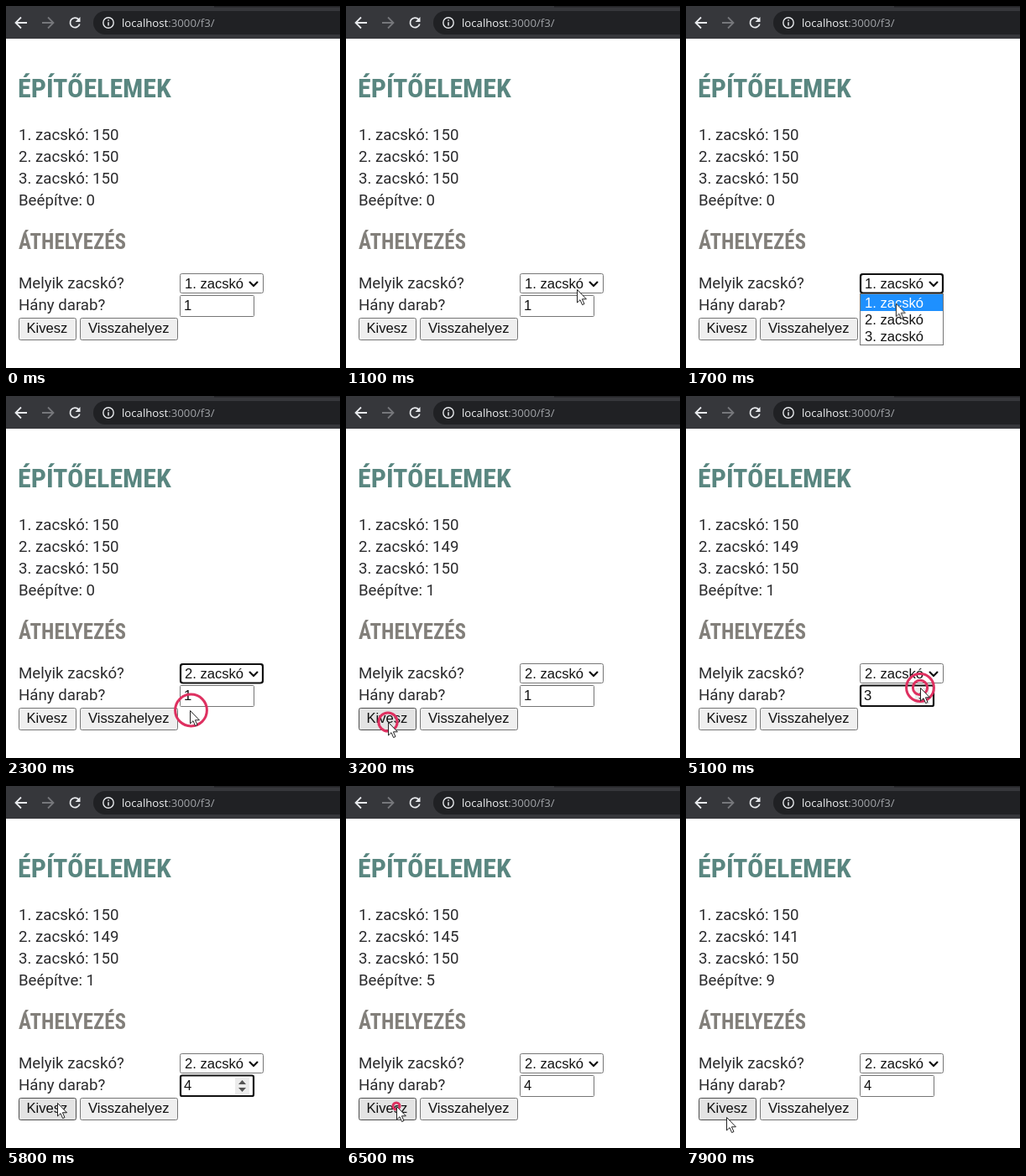
An HTML page that plays this animation: 398x432 px, repeating every 8 s.

```html
<!DOCTYPE html>
<html lang="hu">
<head>
<meta charset="utf-8">
<title>Építőelemek</title>
<style>
html, body { margin: 0; width: 100%; height: 100%; overflow: hidden; background: #fff; }
svg { display: block; }
text { white-space: pre; }

.body { font: 18.67px Roboto, sans-serif; fill: #2b2b2d; }
.head { font-family: "Roboto Condensed", Roboto, sans-serif; font-weight: 700; font-stretch: 75%; }
.ui { font: 16.6px "Liberation Sans", Arial, sans-serif; fill: #111; }
.url { font: 13.2px "Open Sans", sans-serif; fill: #a0a3a7; }
.icon { fill: none; stroke: #e8eaed; stroke-width: 1.8; }
.field { fill: #fff; stroke: #767676; }
.button { fill: #efefef; stroke: #767676; }
.focus { fill: none; stroke: #101010; stroke-width: 2.2; }

/* State changes: hard cuts on one shared 8 s clock */
.step { animation: 8s step-end infinite; }
.count { animation-name: count; }
.choice { animation-name: choice; }
.amount { animation-name: amount; }
.popup { animation-name: popup; }
.pick { animation-name: pick; }
.first { animation-name: first; }
.second { animation-name: second; }
.select-focus { animation-name: select-focus; }
.amount-focus { animation-name: amount-focus; }
.spinner { animation-name: spinner; }
.hover { animation-name: hover; }

@keyframes count {
  0% { transform: none; }
  38.1% { transform: translateY(-26px); }
  76.4% { transform: translateY(-52px); }
  91.6%, 100% { transform: translateY(-78px); }
}
@keyframes choice {
  0% { transform: none; }
  28.4%, 100% { transform: translateY(-26px); }
}
@keyframes amount {
  0% { transform: none; }
  60.2% { transform: translateY(-26px); }
  63% { transform: translateY(-52px); }
  65.8%, 100% { transform: translateY(-78px); }
}
@keyframes popup {
  0% { visibility: hidden; }
  15% { visibility: visible; }
  28.4%, 100% { visibility: hidden; }
}
@keyframes pick {
  0% { transform: none; }
  22.5%, 100% { transform: translateY(20px); }
}
@keyframes first {
  0% { fill: #fff; }
  22.5%, 100% { fill: #111; }
}
@keyframes second {
  0% { fill: #111; }
  22.5%, 100% { fill: #fff; }
}
@keyframes select-focus {
  0% { visibility: hidden; }
  15% { visibility: visible; }
  37%, 100% { visibility: hidden; }
}
@keyframes amount-focus {
  0% { visibility: hidden; }
  59.8% { visibility: visible; }
  75.8%, 100% { visibility: hidden; }
}
@keyframes spinner {
  0% { visibility: hidden; }
  55% { visibility: visible; }
  75.8%, 100% { visibility: hidden; }
}
@keyframes hover {
  0% { fill: #efefef; stroke: #767676; }
  35.2% { fill: #e3e3e3; stroke: #4f4f4f; }
  45% { fill: #efefef; stroke: #767676; }
  71.8%, 100% { fill: #e3e3e3; stroke: #4f4f4f; }
}

/* Pointer path */
.pointer { animation: path 8s ease-in-out infinite; }
@keyframes path {
  0%, 6% { transform: translate(372px, 436px); }
  13.5%, 17.5% { transform: translate(275px, 338px); }
  25.5%, 29.2% { transform: translate(219px, 375px); animation-timing-function: ease-in; }
  31.5% { transform: translate(150px, 394px); animation-timing-function: ease-out; }
  35.7%, 43.75% { transform: translate(50px, 389px); }
  51.25% { transform: translate(241px, 371px); }
  55.6%, 66.5% { transform: translate(279px, 348px); }
  72.5% { transform: translate(61px, 378px); }
  75.5%, 86.25% { transform: translate(60px, 382px); }
  89.5%, 93.5% { transform: translate(36px, 391px); }
  98%, 100% { transform: translate(48px, 395px); }
}

/* Click ring: closes in on the pointer in half a second */
.ring {
  fill: none; stroke: #de3060; stroke-width: 3; visibility: hidden;
  animation: click 8s linear var(--at) infinite;
}
@keyframes click {
  0% { r: 20px; visibility: visible; }
  6% { r: 3px; visibility: visible; }
  6.01%, 100% { r: 3px; visibility: hidden; }
}
</style>
</head>
<body>
<svg width="398" height="432" viewBox="0 0 398 432">
  <rect width="398" height="432" fill="#fff"/>

  <!-- Browser bar -->
  <rect width="398" height="39" fill="#36373b"/>
  <rect x="248" width="150" height="1.5" fill="#222326"/>
  <rect x="104" y="6" width="320" height="28" rx="14" fill="#202124"/>
  <path class="icon" d="M25 20H12M18 13.5L11.5 20L18 26.5"/>
  <path class="icon" style="stroke:#76777b" d="M43 20H56M50 13.5L56.5 20L50 26.5"/>
  <path class="icon" d="M86.6 16A5.8 5.8 0 1 0 87.8 21.5"/>
  <path d="M88.5 13V19H82.5Z" fill="#e8eaed"/>
  <circle class="icon" cx="122" cy="20" r="6.2" style="stroke-width:1.4"/>
  <path class="icon" style="stroke-width:1.5" d="M122 16.2V17.8M122 19.2V23.6"/>
  <text class="url" x="138" y="25"><tspan fill="#f1f3f4">localhost</tspan>:3000/f3/</text>

  <!-- Page -->
  <text class="head" x="14" y="108.5" font-size="32" fill="#598680">ÉPÍTŐELEMEK</text>
  <text class="head" x="15" y="290" font-size="25" fill="#827f7a">ÁTHELYEZÉS</text>
  <g class="body">
    <text x="15" y="160">1. zacskó: 150</text>
    <svg x="15" y="167" width="190" height="26">
      <g class="step count">
        <text y="19">2. zacskó: 150</text>
        <text y="45">2. zacskó: 149</text>
        <text y="71">2. zacskó: 145</text>
        <text y="97">2. zacskó: 141</text>
      </g>
    </svg>
    <text x="15" y="212">3. zacskó: 150</text>
    <svg x="15" y="219" width="190" height="26">
      <g class="step count">
        <text y="19">Beépítve: 0</text>
        <text y="45">Beépítve: 1</text>
        <text y="71">Beépítve: 5</text>
        <text y="97">Beépítve: 9</text>
      </g>
    </svg>
    <text x="15" y="337">Melyik zacskó?</text>
    <text x="15" y="363">Hány darab?</text>
  </g>

  <!-- Form -->
  <g class="ui">
    <rect class="field" x="207.5" y="319.5" width="99" height="23" rx="2"/>
    <svg x="213" y="320" width="74" height="22">
      <g class="step choice">
        <text y="17">1. zacskó</text>
        <text y="43">2. zacskó</text>
      </g>
    </svg>
    <path d="M290 329L295 334L300 329" fill="none" stroke="#111" stroke-width="2.2"/>
    <rect class="focus step select-focus" x="208" y="320" width="98" height="22.5" rx="3"/>

    <rect class="field" x="207.5" y="345.5" width="88" height="25" rx="1"/>
    <svg x="212" y="346" width="50" height="24">
      <g class="step amount">
        <text y="17">1</text>
        <text y="43">2</text>
        <text y="69">3</text>
        <text y="95">4</text>
      </g>
    </svg>
    <g class="step spinner">
      <rect x="273" y="348" width="17" height="20" fill="#ececec"/>
      <path d="M277 356L281.5 351L286 356ZM277 360L281.5 365L286 360Z" fill="#555"/>
    </g>
    <rect class="focus step amount-focus" x="208" y="345.5" width="87" height="24.5" rx="2"/>

    <rect class="button step hover" x="15.5" y="372.5" width="68" height="26" rx="2"/>
    <text x="24.5" y="390">Kivesz</text>
    <rect class="button" x="88.5" y="372.5" width="116" height="26" rx="2"/>
    <text x="98" y="390">Visszahelyez</text>

    <g class="step popup">
      <rect class="field" x="207.5" y="343.5" width="99" height="61"/>
      <rect class="step pick" x="208" y="344" width="98" height="20" fill="#1e90ff"/>
      <text class="step first" x="213" y="360">1. zacskó</text>
      <text class="step second" x="213" y="380">2. zacskó</text>
      <text x="213" y="400">3. zacskó</text>
    </g>
  </g>

  <!-- Clicks and pointer -->
  <circle class="ring" style="--at:1.15s" cx="275" cy="339"/>
  <circle class="ring" style="--at:2.27s" cx="220.5" cy="375"/>
  <circle class="ring" style="--at:2.95s" cx="50" cy="389"/>
  <circle class="ring" style="--at:4.78s" cx="279" cy="348"/>
  <circle class="ring" style="--at:5s" cx="279" cy="348"/>
  <circle class="ring" style="--at:5.22s" cx="279" cy="348"/>
  <circle class="ring" style="--at:6.05s" cx="60" cy="382"/>
  <circle class="ring" style="--at:7.25s" cx="36" cy="391"/>
  <path class="pointer" d="M.5 .5V16L4 12.7L6.6 18.6L9 17.5L6.4 11.8H11.4Z"
    fill="#fff" stroke="#222" stroke-linejoin="round"/>
</svg>
</body>
</html>
```
